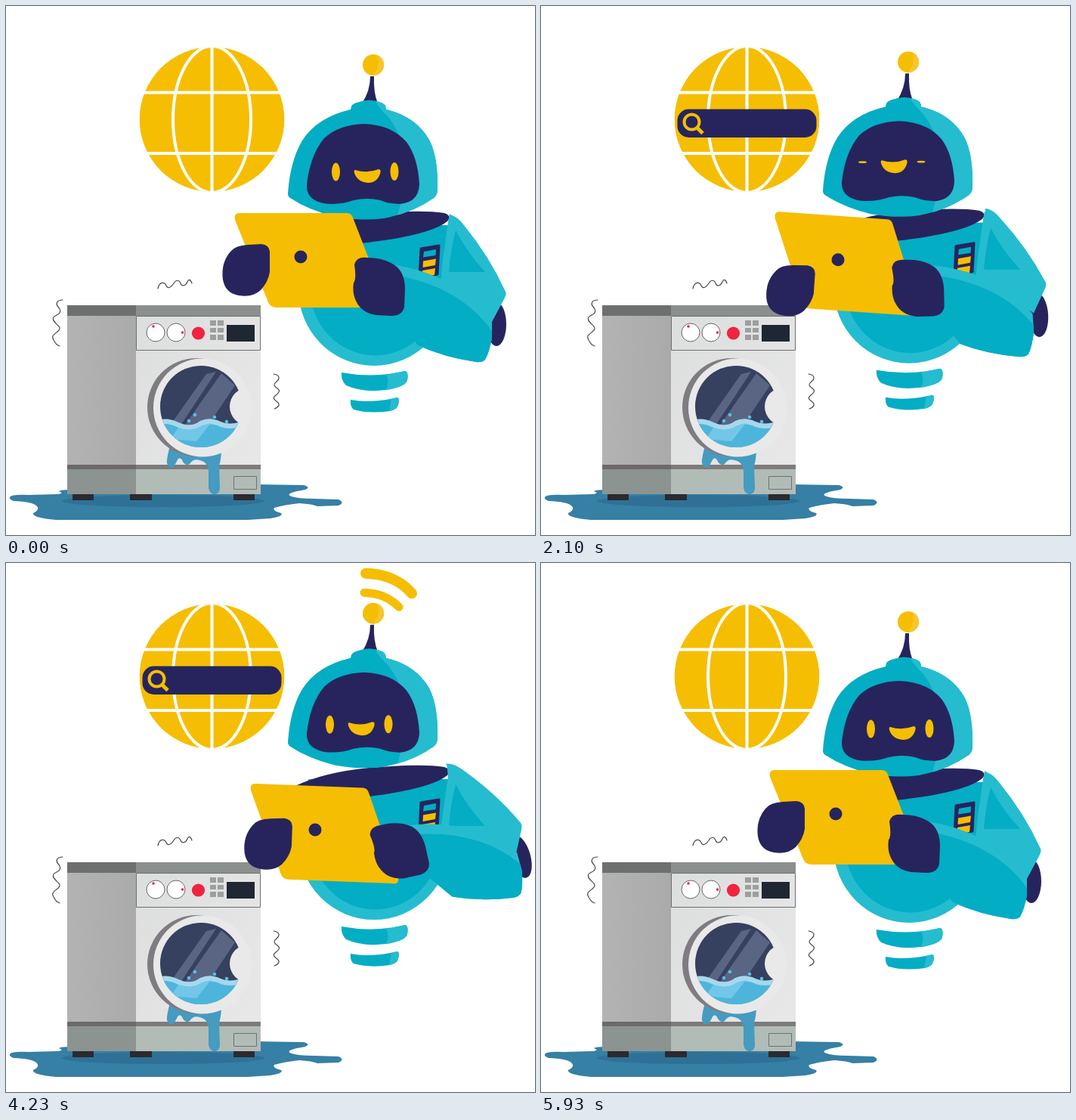
Write an HTML page that moves like this. It is 700x700 px and loops after 6010 ms.

```html
<!DOCTYPE html>
<html lang="en">
<head>
<meta charset="utf-8">
<title>Robot helper</title>
<style>
html, body { margin: 0; width: 100%; height: 100%; overflow: hidden; background: #fff; }
svg { display: block; width: 100vw; height: 100vh; }
.y { fill: #f5be02; }
.n { fill: #27245d; }
.d { fill: #03adc4; }
.l { fill: #25bcd0; }
.line { fill: none; stroke: #4a4a4a; stroke-width: 1.2; stroke-linecap: round; }
.wifi { fill: none; stroke: #f5be02; stroke-linecap: round; }
</style>
</head>
<body>
<svg viewBox="0 0 700 700">
  <defs>
    <clipPath id="glass"><circle cx="258" cy="530" r="54"/></clipPath>
    <clipPath id="door"><circle cx="260" cy="531.5" r="65"/></clipPath>
    <clipPath id="ball"><circle cx="486" cy="78" r="14"/></clipPath>
    <clipPath id="globe"><circle cx="272.5" cy="150" r="96"/></clipPath>
    <clipPath id="skull"><path id="skullShape" d="M373 248Q376 205 392 178Q412 147 456 137Q456 129 467 127Q480 122 494 127Q503 129 503 137Q542 146 560 177Q572 200 571 243Q571 250 566 254Q538 274 500 281Q470 285 436 279Q400 270 376 254Q373 252 373 248Z"/></clipPath>
    <linearGradient id="side"><stop offset="0" stop-color="#b3b3b3"/><stop offset="1" stop-color="#aaa"/></linearGradient>
    <linearGradient id="front" x2="1" y2="1"><stop offset="0" stop-color="#dcdddd"/><stop offset="1" stop-color="#e9e9e9"/></linearGradient>
  </defs>

  <!-- puddle -->
  <path fill="#367fa5" d="M5 650Q7 646 30 647L68 646Q78 645 70 642Q72 640 90 640L330 633L394 634Q404 637 396 640Q366 645 378 649Q386 652 408 652L440 653Q449 657 440 661L412 662Q406 659 388 658Q368 660 355 664Q352 668 364 671Q368 675 350 678L320 680H66Q34 677 36 671Q46 666 40 661Q34 656 10 655Q4 653 5 650Z"/>
  <ellipse cx="208" cy="655" rx="134" ry="8" fill="#2f7196"/>

  <!-- washing machine -->
  <path fill="#2b2a2f" d="M88 645h28v9h-28zM164 645h29v9h-29zM301 645h28v9h-28z"/>
  <path fill="url(#side)" d="M81 396h92v250h-92z"/>
  <path fill="url(#front)" d="M172 396h165v250h-165z"/>
  <path fill="#6d706f" d="M81 396h91v14h-91z"/>
  <path fill="#8b8f8d" d="M172 396h165v14h-165z"/>
  <path fill="#8b9490" d="M81 612h91v34h-91z"/>
  <path fill="#b2bcb7" d="M172 612h165v34h-165z"/>
  <path fill="#6b6969" d="M81 607h91v6h-91z"/>
  <path fill="#7d7b7b" d="M172 607h165v6h-165z"/>
  <path fill="none" stroke="#6c7071" d="M172.500 410.500h164v45h-164zM301.500 622.500h30v17h-30z"/>
  <g fill="#fff" stroke="#666"><circle cx="198" cy="432" r="12"/><circle cx="225" cy="432" r="12"/></g>
  <g fill="#f0243f"><circle cx="195" cy="424" r="1.800"/><circle cx="233.500" cy="432" r="1.800"/><circle cx="254.500" cy="433" r="8.600"/></g>
  <path fill="#9d9f9e" d="M270 416h8v7h-8zM280 416h8v7h-8zM270 426h8v6h-8zM280 426h8v6h-8zM270 435h8v7h-8zM280 435h8v7h-8z"/>
  <path fill="#1f2733" d="M292 422h37v22h-37z"/>
  <path fill="#459bc0" d="M218 578Q212 600 213 605Q216 613 222 610Q226 602 228 599Q232 597 234 603Q238 609 243 606Q248 598 256 601Q267 603 268 616L268 638Q270 646 276 646Q283 645 283 638L282 608Q285 600 285 584Z"/>
  <circle cx="252" cy="531" r="65" fill="#7f7c81"/>
  <circle cx="260" cy="531.500" r="65" fill="#e9e9ea"/>
  <g clip-path="url(#glass)">
    <path fill="#36405f" d="M200 470h120v120h-120z"/>
    <path fill="#5a6483" d="M265 487L278 484L229 558H215ZM285 486L303 502L264 560H233Z"/>
    <path fill="#a6d8ed" d="M200 548Q214 544 226 550Q244 559 257 549Q270 543 284 550Q298 556 316 548V590H200Z"/>
    <path fill="#4db5db" d="M200 554Q214 551 226 557Q244 565 258 556Q270 550 284 557Q298 562 316 555V590H200Z"/>
    <path fill="#72c7e8" d="M228 558Q244 565 258 556L271 552L252 576L218 573Z"/>
  </g>
  <g fill="#58bfe2"><circle cx="242" cy="549" r="2.300"/><circle cx="250" cy="541" r="2.300"/><circle cx="276" cy="544" r="2.300"/><circle cx="292" cy="550" r="2.300"/></g>
  <circle cx="321" cy="530" r="25" fill="#e9e9ea" clip-path="url(#door)"/>
  <g class="line">
    <path d="M75 389C66 389 66 395 69 398S74 406 67 409S62 416 66 420S74 426 68 431S60 437 63 442S66 448 71 450"/>
    <path d="M201 374C203 364 210 365 212 370S219 372 222 367S229 362 231 367S238 370 240 365S245 363 246 367"/>
    <path d="M354 487C362 488 363 493 358 497S355 503 359 506S362 511 357 515S355 521 359 524S361 531 355 533"/>
  </g>

  <!-- globe and search bar -->
  <g clip-path="url(#globe)">
    <circle class="y" cx="272.500" cy="150" r="96"/>
    <g fill="none" stroke="#fff" stroke-width="4"><path d="M272.500 50V250M170 114.500H376M170 195H376"/><ellipse cx="272.500" cy="150" rx="51.500" ry="97"/></g>
  </g>
  <g id="bar">
    <rect class="n" x="180.500" y="136.500" width="184" height="37.500" rx="15"/>
    <g fill="none" stroke="#f5be02" stroke-width="4"><circle cx="199.500" cy="153.500" r="10"/><path stroke-width="5" d="M206.500 161L214 168.500"/></g>
  </g>

  <!-- robot body -->
  <g id="body">
    <path class="d" d="M444 485Q487 493 528 483Q533 484 531 495Q529 504 503 508Q472 512 450 502Q443 495 444 485ZM456 521Q482 526 518 518Q522 520 518 530Q516 534 508 536Q480 540 460 534Q455 530 456 521Z"/>
    <path class="l" d="M503 488L528 483Q533 484 531 495Q529 504 503 508Q508 496 503 488ZM510 520L518 518Q522 520 518 530Q516 534 507 536Z"/>
    <path class="l" d="M400 290H587V375A100 101 0 0 1 387 375Z"/>
    <path class="d" d="M405 290H587Q577 325 575 372A86 90 0 0 1 402 372Z"/>
    <path class="n" d="M383 299Q420 281 480 275Q550 269 580 274Q591 278 584 285Q560 304 470 314L400 318Z"/>
    <path class="n" stroke="#27245d" stroke-width="3" stroke-linejoin="round" d="M549 321L573 317L571 355L547 359Z"/>
    <path class="d" d="M553 325L569 322L568.500 330L552 332.500Z"/>
    <path class="y" d="M552 337.500L569 334.500L568 343L551.500 346ZM551 350L568 347L567 356L551 358Z"/>
    <g id="upper">
      <ellipse class="n" cx="649" cy="421" rx="13" ry="29"/>
      <path class="l" d="M587 276Q597 278 606 290Q640 332 660 376Q663 380 660 386L643 418L580 370Q579 320 587 280Z"/>
    </g>
    <path class="l" d="M587 275L600 284L645 362L577 375Q579 315 587 275Z"/>
    <path class="d" d="M595 297Q610 326 634 352L586 352Q588 325 595 297Z"/>
  </g>

  <!-- head -->
  <g id="head">
    <path class="n" d="M471 129Q482 112 482 93H487Q486 114 492 129Z"/>
    <g clip-path="url(#ball)"><path class="y" d="M470 60h34v34h-34z"/><path fill="#f8c52c" d="M489 60Q499 78 483 94H504V60Z"/></g>
    <use href="#skullShape" class="d"/>
    <path class="l" clip-path="url(#skull)" d="M486 120Q490 132 505 146Q540 190 523 258L516 285H590V120Z"/>
    <path class="n" d="M398 237Q402 198 421 175Q440 157 474 156Q510 157 530 180Q545 200 547 236Q546 260 521 262Q507 262 495 257Q478 253 460 257Q440 264 420 261Q397 256 398 237Z"/>
    <g id="face" class="y">
      <ellipse class="eye" cx="436.500" cy="219.500" rx="5.500" ry="12"/>
      <ellipse class="eye" cx="514" cy="219" rx="5.500" ry="12"/>
      <path d="M462 217Q478 222 493 216Q497 216 495 222Q491 234 479 234Q465 233 461 221Q460 217 462 217Z"/>
    </g>
    <path id="near" class="wifi" stroke-width="11" d="M474 50.500Q502 51 520 69.500"/>
    <path id="far" class="wifi" stroke-width="14" d="M476 25Q515 26 537 51.500"/>
  </g>

  <!-- arms and tablet -->
  <g id="arms">
    <g id="tablet">
      <path class="y" d="M309 274H451Q457 274 459 280L502 391Q504 399 497 399H358Q350 399 347 392L303 283Q301 274 309 274Z"/>
      <circle class="n" cx="390" cy="332" r="8.500"/>
    </g>
    <path id="palm" class="n" d="M297 325Q303 317 320 316L338 315Q348 316 349 325L349 352Q347 365 337 376Q326 386 308 383Q290 380 287 362Q284 340 297 325Z"/>
    <g id="fore">
      <path class="l" d="M510 342Q594 354 643 415V440Q639 460 634 468Q630 472 622 471Q580 465 545 449L510 400Z"/>
      <path class="d" d="M510 355Q600 370 643 430V440Q639 460 634 468Q630 472 622 471Q580 465 545 449L510 400Z"/>
      <path class="n" d="M461 342Q464 331 478 333Q502 333 517 345Q528 355 528 375L527 398Q525 409 512 410L490 409Q470 406 463 390Q458 380 460 366Q464 362 461 342Z"/>
    </g>
  </g>
</svg>
<script>
const LOOP = 6010;
const $ = id => document.getElementById(id);
const eyes = [...document.querySelectorAll('.eye')];
const clamp = x => Math.min(1, Math.max(0, x));
const ease = x => (1 - Math.cos(Math.PI * clamp(x))) / 2;
const ramp = (t, from, to) => ease((t - from) / (to - from));
const swell = (t, start, peak, end) => ramp(t, start, peak) * (1 - ramp(t, peak, end));

// Each part: pivot, then [dx, dy, degrees] for rest, raised, lowered and wide poses
const parts = {
  tablet: { pivot: [390, 332], poses: [[0, 0, 0], [22, -23, 2], [3, 7, 4], [19, 25, 2.2]] },
  palm: { pivot: [318, 350], poses: [[0, 0, 0], [17, -28, 2], [12, 30, 4], [29, 26, 2]] },
  fore: { pivot: [493.5, 371], poses: [[0, 0, 0], [21, -20, 3.5], [5, 5, -3.7], [27, 12.5, -15]] },
  upper: { pivot: [588, 278], poses: [[0, 0, 0], [-1, -4, -5.5], [1, -5, -3.3], [-4, -7, -15.5]] },
  face: { pivot: [475, 220], poses: [[0, 0, 0], [-8.5, 7, 0], [-11, -9, 0], [-8, 5.5, 0]] }
};
const moves = [[100, 600, 1], [1400, 2000, 2], [2630, 3230, 3], [4560, 5110, 0]];
const blinks = [950, 2100, 3330, 5050];

function poseAt(t, poses) {
  let now = poses[0];
  for (const [from, to, next] of moves) {
    if (t < from) break;
    const k = ramp(t, from, to);
    now = now.map((v, i) => v + (poses[next][i] - v) * k);
  }
  return now;
}

function show(id, on) {
  $(id).style.visibility = on ? 'visible' : 'hidden';
}

function draw(t) {
  for (const id in parts) {
    const { pivot, poses } = parts[id];
    const [x, y, turn] = poseAt(t, poses);
    $(id).setAttribute('transform', `translate(${x} ${y}) rotate(${turn} ${pivot})`);
  }

  const bob = -6.4 * swell(t, 1000, 3200, 5600);
  const lift = -12 * swell(t, 1000, 3900, 6010);
  $('body').setAttribute('transform', `translate(0 ${bob})`);
  $('arms').setAttribute('transform', `translate(0 ${bob})`);
  $('head').setAttribute('transform', `translate(0 ${lift})`);

  const open = Math.min(1, ...blinks.map(c => Math.abs(t - c) / 120));
  eyes.forEach(e => e.setAttribute('ry', Math.max(1.4, 12 * open)));

  const signal = t % 3000;
  show('near', signal >= 500 && signal < 1800);
  show('far', signal >= 750 && signal < 1800);

  const width = clamp((t - 500) / 250) * clamp((5250 - t) / 220);
  show('bar', width > 0);
  $('bar').setAttribute('transform', `translate(${272.5 * (1 - width)} 0) scale(${width} 1)`);
}

function frame() {
  draw(performance.now() % LOOP);
  requestAnimationFrame(frame);
}
frame();
</script>
</body>
</html>
```
